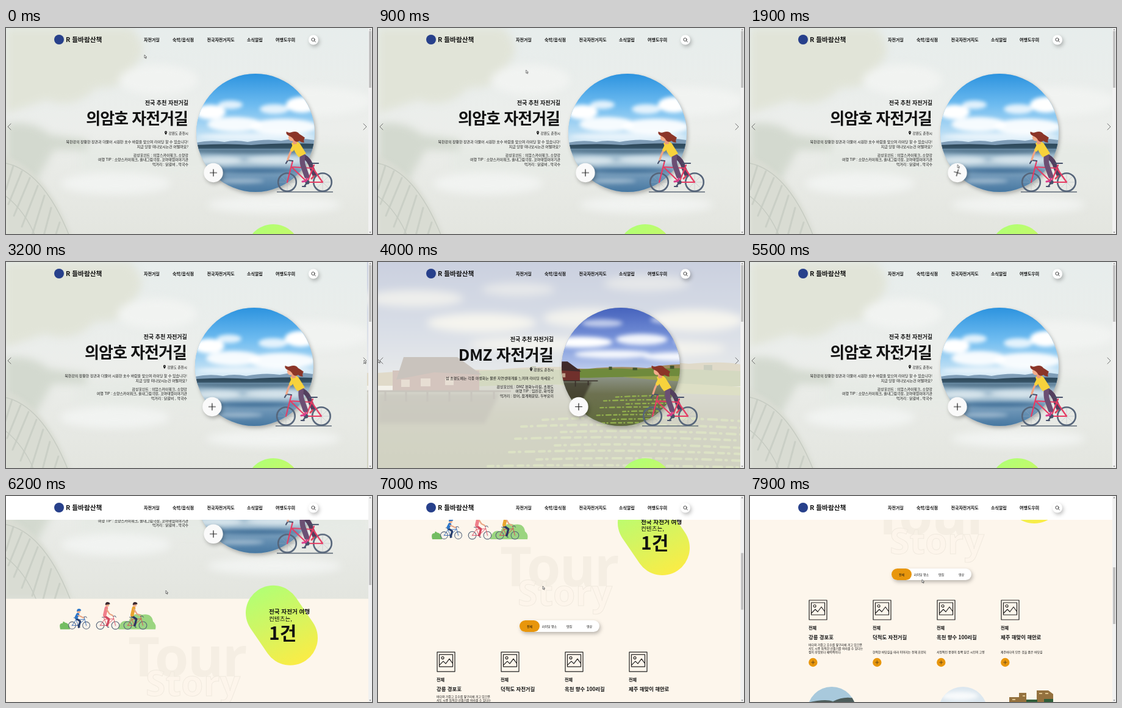
Recreate the animation shown at these times as an HTML page. Size 600 by 338 pixels, loop 8 s.

```html
<!DOCTYPE html>
<html lang="ko">
<head>
<meta charset="utf-8">
<title>자전거길 안내</title>
<style>
html, body { margin: 0; width: 100%; height: 100%; overflow: hidden; background: #fdf6ec; }
svg { display: block; width: 100vw; height: 100vh; }
text { font-family: "Noto Sans CJK KR", "Noto Sans CJK", "Noto Sans CJK JP", sans-serif; fill: #111; }
.end { text-anchor: end; }
.mid { text-anchor: middle; }
.bold { font-weight: 700; }
.title { font-size: 26px; font-weight: 800; letter-spacing: -1px; }
.wide { letter-spacing: -.5px; }
.sub { font-size: 9px; font-weight: 700; }
.small { font-size: 5.95px; }
.place { font-size: 5.6px; }
.nav { font-size: 7px; font-weight: 600; }
.latin { font-family: "Noto Sans", sans-serif; font-weight: 700; }
.shade { filter: drop-shadow(2px 3px 3px #0004); }
.soft { filter: blur(7px); }
.haze { filter: blur(3px); }
.line { fill: none; stroke-linecap: round; stroke-linejoin: round; }

.page, .thumb, .track, .bar, .spin, .cursor { animation: 8s linear infinite; }
.page { animation-name: scroll; }
.thumb { animation-name: thumb; }
.track { animation-name: slide; }
.bar { animation-name: bar; }
.cursor { animation-name: point; }
.spin { animation-name: spin; transform-box: fill-box; transform-origin: center; }

@keyframes scroll {
  0%, 71.25% { transform: translateY(0); }
  77.5% { transform: translateY(-175px); }
  85% { transform: translateY(-290px); }
  94%, 100% { transform: translateY(-408px); }
}
@keyframes thumb {
  0%, 71.25% { transform: translateY(0); }
  77.5% { transform: translateY(48px); }
  85% { transform: translateY(79.5px); }
  94%, 100% { transform: translateY(112px); }
}
@keyframes slide {
  0% { transform: translateX(0); }
  39.93% { transform: translateX(0); animation-timing-function: ease; }
  49.93% { transform: translateX(-594px); }
  58.78% { transform: translateX(-594px); animation-timing-function: ease; }
  68.78%, 100% { transform: translateX(0); }
}
@keyframes bar {
  0%, 71.25% { opacity: 0; }
  73%, 100% { opacity: 1; }
}
@keyframes spin {
  0% { transform: rotate(0); }
  23.2% { transform: rotate(0); animation-timing-function: ease; }
  27% { transform: rotate(90deg); }
  28.75% { transform: rotate(90deg); animation-timing-function: ease; }
  32.5%, 100% { transform: rotate(0); }
}
@keyframes point {
  0%, 7% { transform: translate(227px, 44px); animation-timing-function: ease-in-out; }
  23.5% { transform: translate(340px, 224px); }
  28% { transform: translate(343px, 228px); animation-timing-function: ease-in-out; }
  37%, 42% { transform: translate(587px, 161px); animation-timing-function: ease-in-out; }
  49.5% { transform: translate(0, 160px); }
  56%, 59% { transform: translate(4px, 160px); animation-timing-function: ease-in-out; }
  71%, 80% { transform: translate(262px, 155px); animation-timing-function: ease-in-out; }
  97%, 100% { transform: translate(282px, 137px); }
}
</style>
</head>
<body>
<svg viewBox="0 0 600 338" preserveAspectRatio="none">
  <defs>
    <linearGradient id="pale" x2="0" y2="1">
      <stop stop-color="#e7edec"/><stop offset=".5" stop-color="#eceeeb"/><stop offset="1" stop-color="#e3e5df"/>
    </linearGradient>
    <linearGradient id="sky" x2="0" y2="1">
      <stop stop-color="#2c93df"/><stop offset=".45" stop-color="#6fbcf0"/><stop offset="1" stop-color="#d9ebf6"/>
    </linearGradient>
    <linearGradient id="lake" x2="0" y2="1">
      <stop stop-color="#86a9c2"/><stop offset=".3" stop-color="#b4cbd9"/><stop offset=".65" stop-color="#6a93b5"/><stop offset="1" stop-color="#44759f"/>
    </linearGradient>
    <linearGradient id="dusk" x2="0" y2="1">
      <stop stop-color="#4663bd"/><stop offset=".55" stop-color="#7f9add"/><stop offset="1" stop-color="#c6d3ef"/>
    </linearGradient>
    <linearGradient id="pond" x2="0" y2="1">
      <stop stop-color="#8d9488"/><stop offset=".35" stop-color="#6d7150"/><stop offset="1" stop-color="#5f6a3b"/>
    </linearGradient>
    <linearGradient id="lime" gradientUnits="userSpaceOnUse" x1="420" y1="325" x2="484" y2="450">
      <stop stop-color="#b2ff74"/><stop offset=".45" stop-color="#d2f562"/><stop offset="1" stop-color="#fbec45"/>
    </linearGradient>
    <clipPath id="round"><circle cx="409" cy="172" r="97"/></clipPath>
    <clipPath id="frame"><rect width="594" height="344"/></clipPath>
    <clipPath id="dot"><circle r="40"/></clipPath>

    <g id="bike" class="line">
      <g stroke="#56657a" stroke-width="2.6">
        <circle cx="-29" r="14.8"/><circle cx="29" r="14.8"/>
      </g>
      <path d="M-42 0h26M-29-13v26M-38-9l18 18M-38 9l18-18M16 0h26M29-13v26M20-9l18 18M20 9l18-18" stroke="#a3acbc" stroke-width=".4"/>
      <path d="M-29 0L-13-23 22-25-4 0-29 0M-15-28L-4 0M20-35L29 0" stroke="currentColor" stroke-width="2.2"/>
      <path d="M-22-31h13M20-35l8-1 3 5M-4 0l5 7M-1 7h5" stroke="#47516b" stroke-width="2.2"/>
      <circle cx="-4" r="3.6" fill="#47516b"/>
    </g>

    <g id="rider">
      <path d="M444 269h92" stroke="#5d6977" stroke-width="1.6"/>
      <path class="line" d="M487 210q11 6 14 19l5 12" stroke="#533f5e" stroke-width="7.5"/>
      <path class="line" d="M505 243l-4 4" stroke="#e0455f" stroke-width="3"/>
      <g transform="translate(490 253) scale(-1 1)"><use href="#bike" color="#e63c63"/></g>
      <path class="line" d="M486 209q-1 10 1 17l6 17" stroke="#6b4f73" stroke-width="8.5"/>
      <path class="line" d="M493 247l-1 4-6 1" stroke="#d93c8b" stroke-width="3"/>
      <path d="M468 189q8-6 14 1l10 16-12 6q-7-7-12-23z" fill="#f7d23c"/>
      <path class="line" d="M471 194l-6 13-3 9" stroke="#f0a585" stroke-width="3.2"/>
      <path class="line" d="M473 192l-4 8" stroke="#f7d23c" stroke-width="5.5"/>
      <path d="M469 183l7-1 1 8-6 1z" fill="#eb9b7c"/>
      <ellipse cx="468" cy="179.5" rx="5" ry="6" fill="#f4ad8c"/>
      <path d="M462 176q-4-3-2-6 4 3 8 1 9-3 13 3 5 3 9 6-3 4-1 8-5 0-8-3-5 4-9-1-2-5-10-8z" fill="#8b3528"/>
    </g>

    <g id="plus" class="line"><path d="M-5.5 0h11M0-5.5v11" stroke="#222" stroke-width="1.2"/></g>

    <g id="water">
      <rect x="312" y="75" width="194" height="116" fill="url(#sky)"/>
      <g fill="#fff" class="haze">
        <ellipse cx="335" cy="138" rx="25" ry="12"/><ellipse cx="368" cy="126" rx="20" ry="7" opacity=".8"/>
        <ellipse cx="440" cy="133" rx="24" ry="8" opacity=".8"/><ellipse cx="485" cy="126" rx="26" ry="13"/>
        <ellipse cx="375" cy="158" rx="45" ry="12" opacity=".9"/><ellipse cx="455" cy="162" rx="55" ry="13" opacity=".9"/>
        <ellipse cx="409" cy="178" rx="95" ry="6" opacity=".6"/>
      </g>
      <path d="M312 188q24-5 46-1 18-4 38 0 30-6 55-2 26-6 55-1v14H312z" fill="#7f9db7"/>
      <path d="M312 192q50-3 90 0 48-4 104-2v9H312z" fill="#2f4a5c"/>
      <rect x="312" y="198" width="194" height="73" fill="url(#lake)"/>
      <g class="haze">
        <path d="M312 198h194v5q-90 5-194 1z" fill="#4b6c84"/>
        <g fill="#e6eff4" opacity=".7"><ellipse cx="350" cy="217" rx="36" ry="6"/><ellipse cx="445" cy="216" rx="50" ry="6"/><ellipse cx="385" cy="251" rx="38" ry="4" opacity=".6"/></g>
        <ellipse cx="410" cy="234" rx="75" ry="4" fill="#3f6e97"/>
      </g>
    </g>

    <g id="village">
      <rect width="594" height="190" fill="url(#dusk)"/>
      <g fill="#fff" class="soft">
        <ellipse cx="60" cy="60" rx="80" ry="14" opacity=".8"/><ellipse cx="230" cy="45" rx="60" ry="11" opacity=".6"/>
        <ellipse cx="440" cy="35" rx="70" ry="13" opacity=".6"/><ellipse cx="170" cy="100" rx="90" ry="16"/>
        <ellipse cx="345" cy="92" rx="75" ry="16" opacity=".9"/><ellipse cx="520" cy="96" rx="80" ry="18"/>
        <ellipse cx="260" cy="135" rx="110" ry="12" opacity=".9"/><ellipse cx="460" cy="142" rx="110" ry="13" opacity=".9"/>
      </g>
      <path d="M0 182q100-8 190-5 90-9 170-2 80-16 150-8 55-5 84 1v35H0z" fill="#a38c5f"/>
      <path d="M150 180q90-7 170-2 130-6 274 1v25H150z" fill="#6f8a3c"/>
      <path d="M250 180v-9h9v9m60 1v-7h13v7m95-4v-9h12v9m95 0v-8h14v9" fill="#43562f"/>
      <path d="M0 212q160-10 300-11 150-4 294 4v139H0z" fill="url(#pond)"/>
      <path d="M290 201q150-8 304 4v14q-160-4-304-18z" fill="#97a24c"/>
      <path d="M0 215h200l-25 50H0z" fill="#3b3729" opacity=".75" class="haze"/>
      <path d="M24 178h142v34H24z" fill="#70302c"/>
      <path d="M42 156h88l40 29-78-4-62 12z" fill="#3f2a2a"/>
      <path d="M38 193h14v12H38zM70 191h16v13H70zM110 190h14v12h-14z" fill="#c0a08a"/>
      <path d="M0 212h218M12 212v16m34-16v17m35-17v17m36-17v17m36-17v17m37-17v13" stroke="#39302a" stroke-width="3"/>
      <g class="line" stroke="#93b04e" stroke-width="4" stroke-dasharray="9 7 2 9 14 8">
        <path d="M270 259q150-9 324 2M235 270q170-7 359 2M300 279q140-5 294 4M225 290q190-6 369 3M290 301q130-5 304 4M215 312q190-6 379 3M260 324q160-5 334 2M180 335q190-4 414 2"/>
      </g>
    </g>

    <g id="button"><circle cx="340" cy="237.5" r="15.7" fill="#fafafa" class="shade"/></g>
    <g id="pin"><path d="M0 3.2C-3-.4-2.2-3 0-3S3-.4 0 3.2z" fill="#111"/><circle cy="-1" r=".8" fill="#eee"/></g>
    <g id="picture" class="line" stroke="#222" stroke-width="1.2">
      <rect x="1" width="29" height="32"/><rect x="4.5" y="4" width="22" height="20"/>
      <circle cx="10" cy="9.5" r="2"/><path d="M5 21l6-6 4 4 6-8 5 7"/>
    </g>
  </defs>

  <g class="page">
    <g class="track">
      <g>
        <rect width="595" height="344" fill="url(#pale)"/>
        <g clip-path="url(#frame)">
          <g class="soft">
            <path d="M0 0h205q35 35 5 62-8 38-62 36-36 37-82 20L0 140z" fill="#e1e4d8"/>
            <g fill="#f1f3f1"><ellipse cx="250" cy="85" rx="65" ry="25"/><ellipse cx="500" cy="120" rx="100" ry="24"/><ellipse cx="180" cy="255" rx="90" ry="18"/><ellipse cx="440" cy="290" rx="110" ry="14"/></g>
            <path d="M120 195q120-8 250 0 120-9 224-2v42q-200 9-474 0z" fill="#e6eae5"/>
            <path d="M0 157q44-6 72 18l62 9v16H78l-28 50H0z" fill="#d3d9cf"/>
          </g>
          <path d="M0 210q68 25 108 134H0z" fill="#d9dcd3" class="haze"/>
          <g class="line" stroke="#c6cbc2" stroke-width="1.5">
            <path d="M0 222q62 13 105 122M0 276q32 25 49 68"/>
            <path d="M0 265l12-39M4 289l22-54M13 308l26-62M26 326l26-67M43 339l20-64M61 344l13-49M80 344l8-25" stroke-width="3" opacity=".75"/>
          </g>
        </g>
        <g class="end">
          <text class="sub" x="299" y="126">전국 추천 자전거길</text>
          <text class="title" x="298" y="157.5">의암호 자전거길</text>
          <g class="small">
            <text class="place" x="299" y="174.5">강원도 춘천시</text>
            <text x="299" y="189">북한강의 장황한 장관과 더불어 시원한 호수 바람을 맞으며 라이딩 할 수 있습니다!</text>
            <text x="299" y="196.5">지금 당장 떠나보시는건 어떨까요?</text>
            <text x="299" y="210.5">감상포인트 : 의암스카이워크, 소양강</text>
            <text x="299" y="218">여행 TIP : 소양스카이워크, 솔내그림극장, 꼬마태엽이야기관</text>
            <text x="299" y="225.5">먹거리 : 닭갈비 , 막국수</text>
          </g>
        </g>
        <use href="#pin" x="262" y="172"/>
        <circle cx="409" cy="172" r="97" fill="#9fc4df" class="shade"/>
        <g clip-path="url(#round)"><use href="#water"/></g>
        <use href="#button"/>
        <g transform="translate(340 237.5)"><g class="spin"><use href="#plus"/></g></g>
        <use href="#rider"/>
      </g>

      <g transform="translate(594)">
        <rect width="594" height="344" fill="#f3f1ea"/>
        <g clip-path="url(#frame)" opacity=".23"><use href="#village"/></g>
        <g class="end">
          <text class="sub" x="288" y="130">전국 추천 자전거길</text>
          <text class="title wide" x="287.5" y="161.5">DMZ 자전거길</text>
          <g class="small">
            <text class="place" x="288" y="178.5">강원도 춘천시</text>
            <text x="288" y="192.5">섬 초평도에는 각종 야생화는 물론 자연생태계를 느끼며 라이딩 하세요~!</text>
            <text x="288" y="206.5">감상포인트 : DMZ 평화누리길, 초평도</text>
            <text x="288" y="214">여행 TIP : 임진강, 화석정</text>
            <text x="288" y="221.5">먹거리 : 장어, 참게매운탕, 두부요리</text>
          </g>
        </g>
        <use href="#pin" x="251" y="176"/>
        <g transform="translate(-11)">
          <circle cx="409" cy="172" r="97" fill="#8aa0c0" class="shade"/>
          <g clip-path="url(#round)"><use href="#village" transform="translate(248 75) scale(.566)"/></g>
          <use href="#button"/>
          <use href="#plus" x="340" y="237.5"/>
          <use href="#rider"/>
        </g>
      </g>
    </g>
    <path class="line" d="M8 157l-5 5 5 5M586 157l5 5-5 5" stroke="#555" stroke-width=".8"/>

    <rect y="344" width="600" height="450" fill="#fdf6ec"/>
    <g fill="#73bd62">
      <path d="M89 394q-3-11 4-10 0-5 4-1 7 1 8 11z"/>
      <path d="M184 394q3-17 17-13 6-16 22-11 16-3 18 11 6 5 4 13z" fill="#9bd580"/>
    </g>
    <g id="family"></g>
    <text class="latin" x="200" y="471" font-size="90" letter-spacing="-2" style="fill:#f5eee3">Tour</text>
    <text class="latin" x="229" y="503" font-size="59" style="fill:#fdf6ec;fill-opacity:.4;stroke:#f0e9de;stroke-width:1">Story</text>
    <path class="line" d="M438 367l28 41" stroke="url(#lime)" stroke-width="90"/>
    <text class="bold" x="431" y="368.5" font-size="9.6">전국 자전거 여행</text>
    <text x="431" y="380" font-size="9.6">컨텐츠는,</text>
    <text class="bold" x="431" y="411" font-size="30">1건</text>

    <rect x="232" y="527" width="131" height="19" rx="9.5" fill="#fff" class="shade"/>
    <rect x="232" y="527" width="33" height="19" rx="9.5" fill="#e8960c"/>
    <g class="mid" font-size="5">
      <text x="248.5" y="538.5">전체</text><text x="281" y="538.5">라이딩 명소</text>
      <text x="313.5" y="538.5">맛집</text><text x="346.5" y="538.5">영상</text>
    </g>
    <g id="cards"></g>
    <g transform="translate(134 761)" clip-path="url(#dot)">
      <rect x="-40" y="-40" width="80" height="80" fill="#a8c9dc"/>
      <path d="M-40-14q30-7 42-2 20-10 38-4v60h-80z" fill="#4d5d5b"/>
    </g>
    <g transform="translate(349 761)" clip-path="url(#dot)">
      <rect x="-40" y="-40" width="80" height="80" fill="#dce7ef"/>
      <ellipse cx="-5" cy="-25" rx="30" ry="7" fill="#f8fafb" class="haze"/>
    </g>
    <path d="M425 746v-8h16v-7h12v11h17v-15h19l8 6v13z" fill="#94713e"/>
    <path d="M430 742h5m12-6h4m23-4h5m5 0h5" stroke="#e0c58e" stroke-width="2"/>
    <path d="M453 742h18v4h-18zM482 741h15v5h-15z" fill="#315f3b"/>
  </g>

  <rect class="bar" width="594" height="39" fill="#fff"/>
  <circle cx="87" cy="19" r="8" fill="#27408b"/>
  <text x="98" y="22.8" font-size="10.7" font-weight="800">R 들바람산책</text>
  <g class="nav">
    <text x="226" y="22">자전거길</text><text x="273" y="22">숙박/음식점</text>
    <text x="329.5" y="22">전국자전거지도</text><text x="395" y="22">소식알림</text>
    <text x="442" y="22">여행도우미</text>
  </g>
  <circle cx="504" cy="19.5" r="8" fill="#fff" class="shade"/>
  <g class="line" stroke="#333" stroke-width=".9"><circle cx="503.5" cy="19" r="2.6"/><path d="M505.5 21l2 2"/></g>

  <rect x="594" width="6" height="338" fill="#f1f1f1"/>
  <path d="M595.5 3.5l1.5-2 1.5 2zM595.5 334.5l1.5 2 1.5-2z" fill="#777"/>
  <rect class="thumb" x="595" y="5" width="4" height="93" fill="#c1c1c1"/>
  <g class="cursor"><path d="M0 0v5.2l1.2-1.1.9 2 .9-.4-.9-1.9h1.6z" fill="#fff" stroke="#222" stroke-width=".6"/></g>
</svg>
<script>
const add = (id, html) => document.getElementById(id).innerHTML = html;

// Small cyclists: x, scale, shirt, trousers, bike
const family = [
  [120, .40, '#2d77c9', '#28406f', '#2864b5'],
  [167, .43, '#f07f8a', '#d2495f', '#e05166'],
  [212, .43, '#e8a52f', '#2b3763', '#d94850']
];
add('family', family.map(([x, s, shirt, legs, frame], i) => {
  const lift = i ? 0 : 14;
  return `<g transform="translate(${x} 387.5) scale(${s})">
    <use href="#bike" color="${frame}"/>
    <g class="line" transform="translate(0 ${lift / 2})">
      <path d="M-13-36L4-24-2 0" stroke="${legs}" stroke-width="8"/>
      <path d="M-12-40l6-${26 - lift}" stroke="${shirt}" stroke-width="13"/>
      <path d="M-5-${62 - lift}L6-44 18-38" stroke="#eaa582" stroke-width="5"/>
      <circle cx="-2" cy="${lift - 78}" r="7" fill="#efae8c"/>
      <path d="M-10 ${lift - 78}q0-12 10-11 8 1 8 8z" fill="${i ? '#3b2a31' : '#2d77c9'}"/>
    </g></g>`;
}).join(''));

const cards = [
  ['강릉 경포호', '바다와 가깝고 호수를 옆구리에 끼고 있으면', '서도 시종 듬직한 산줄기를 바라볼 수 있다는', '점이 무엇보다 매력적이다.'],
  ['덕적도 자전거길', '', '', '한적한 바닷길을 따라 이어지는 천혜 휴양지'],
  ['옥천 향수 100리길', '', '', '서정적인 풍경이 듬뿍 담긴 시인의 고향'],
  ['제주 해맞이 해안로', '', '', '제주바다의 모든 것을 품은 바닷길']
];
add('cards', cards.map(([name, ...lines], i) => `<g transform="translate(${96 + i * 105} 579)">
  <use href="#picture"/>
  <text class="bold" y="47.5" font-size="7.2">전체</text>
  <text class="bold" y="64" font-size="8.4">${name}</text>
  ${lines.map((line, n) => `<text y="${74.5 + n * 6}" font-size="4.9">${line}</text>`).join('')}
  <circle cx="7.3" cy="102" r="7.2" fill="#e8960c"/>
  <use href="#plus" transform="translate(7.3 102) scale(.5)"/>
</g>`).join(''));
</script>
</body>
</html>
```
